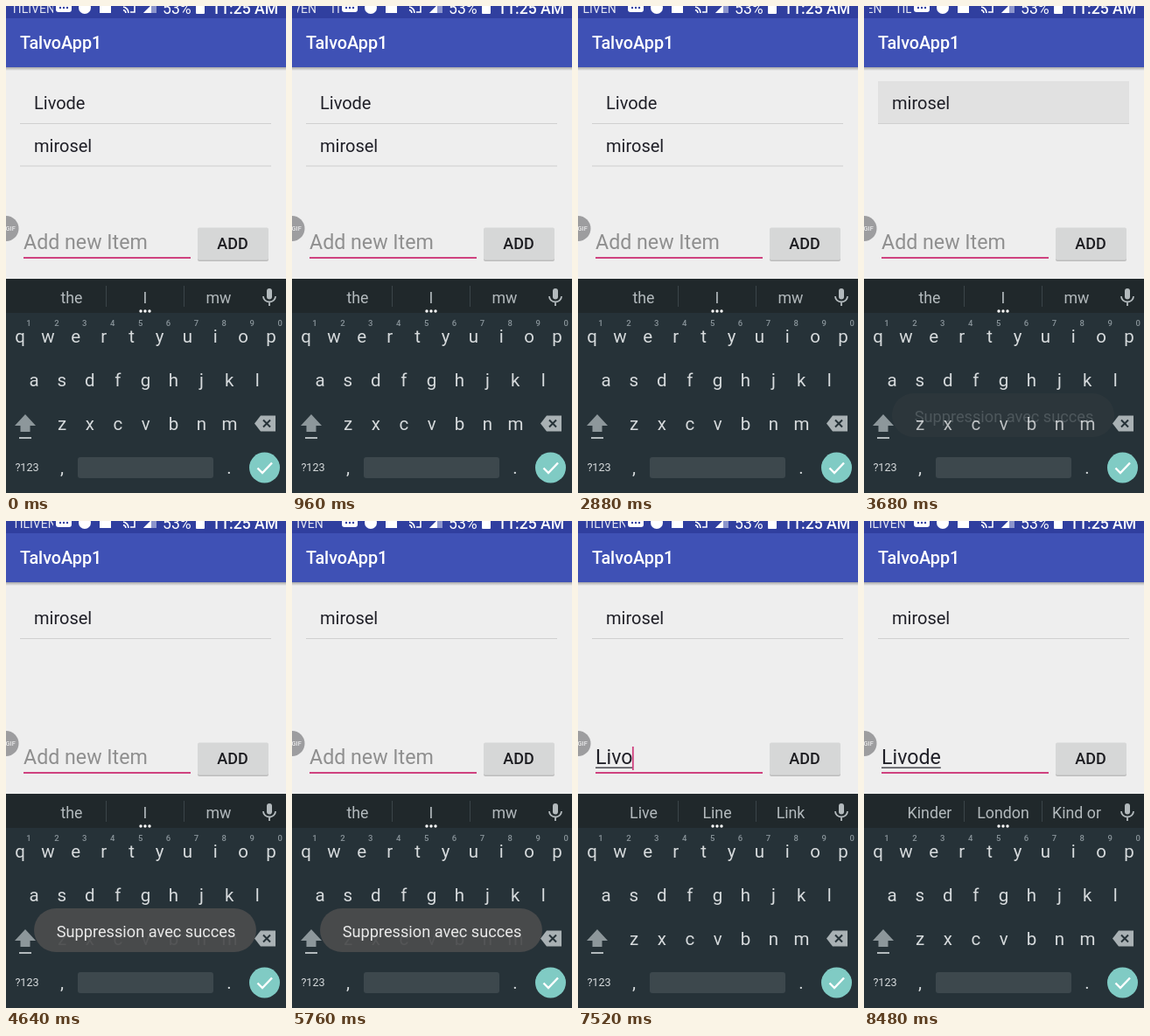
These frames come from a looping animation (320x557 px, 8640 ms). An HTML page:

```html
<!DOCTYPE html>
<html lang="en">
<head>
<meta charset="utf-8">
<title>List app</title>
<style>
  html, body { margin: 0; width: 100%; height: 100%; overflow: hidden; background: #eee; }
  svg { display: block; width: 320px; height: 557px; font-family: Roboto, "Noto Sans", sans-serif; }
  text { white-space: pre; }
</style>
</head>
<body>
<svg id="stage" viewBox="0 0 320 557">
  <defs>
    <clipPath id="carrierClip"><rect x="6" y="0" width="48" height="14"/></clipPath>
    <linearGradient id="shade" x2="0" y2="1">
      <stop offset="0" stop-color="#000" stop-opacity=".3"/>
      <stop offset="1" stop-color="#000" stop-opacity="0"/>
    </linearGradient>
  </defs>
</svg>
<script>
const LOOP = 8640, STEP = 160;
const APP = 'TalvoApp1', FIRST = 'Livode', SECOND = 'mirosel', CARRIER = 'TILIVEN';
const PINK = '#cf427f', KEY = '#d6dadc', DIM = '#b3babd';
const stage = document.getElementById('stage');

function add(tag, attrs, parent = stage) {
  const el = document.createElementNS('http://www.w3.org/2000/svg', tag);
  for (const k in attrs) el.setAttribute(k, attrs[k]);
  return parent.appendChild(el);
}
const rect = (x, y, width, height, fill, more, parent) =>
  add('rect', { x, y, width, height, fill, ...more }, parent);
const circle = (cx, cy, r, fill, parent) => add('circle', { cx, cy, r, fill }, parent);
const path = (d, fill, more) => add('path', { d, fill, ...more });
function label(str, x, y, size, fill, more, parent) {
  const el = add('text', { x, y, 'font-size': size, fill, ...more }, parent);
  el.textContent = str;
  return el;
}
const mid = { 'text-anchor': 'middle' };
const medium = { 'font-weight': 500 };
const stroke = (color, width) => ({ stroke: color, 'stroke-width': width });
const show = (el, on) => el.setAttribute('opacity', +on);

// App bar and status bar
rect(0, 0, 320, 557, '#eee');
rect(0, 70, 320, 4, 'url(#shade)');
rect(0, 0, 320, 70, '#3f51b5');
rect(0, 0, 320, 14, '#303f9f');
label(APP, 16, 49, 19.8, '#fff', medium);

const clip = add('g', { 'clip-path': 'url(#carrierClip)' });
const marquee = add('g', {}, clip);
const GAP = 65;
[0, GAP].forEach(x => label(CARRIER, 6 + x, 8, 14, '#e4e6f2', {}, marquee));

rect(57, -4, 18, 11, '#fff', { rx: 3 });
[62, 66, 70].forEach(x => circle(x, 2, 1.2, '#303f9f'));
circle(90, 2, 7, '#fff');
rect(107, -4, 13, 12, '#fff');
path('M134 -2H147V7H142M134 1a7 7 0 0 1 6 7M134 4.500a4 4 0 0 1 3 3.500', 'none', stroke('#fff', 1.6));
path('M157 8L172 -7V8Z', '#8c95cc');
path('M157 8L166 -1V8Z', '#fff');
label('53%', 179, 9, 17.6, '#fff');
rect(217, -5, 10, 14, '#fff', { rx: 1 });
label('11:25 AM', 235, 9, 17.6, '#fff', medium);

// List
const glow = rect(16, 86, 287, 48, '#e1e1e1');
rect(16, 134, 287, 1, '#d0d0d0');
const row1 = label(FIRST, 32, 118, 20, '#202028');
const row2 = add('g', {});
label(SECOND, 32, 167, 20, '#202028', {}, row2);
rect(16, 182.5, 287, 1, '#d0d0d0', {}, row2);

// Input and button
const hint = label('Add new Item', 20, 278, 23.2, '#8f8f8f');
const typed = label('', 20, 278, 23.2, '#202028');
const under = rect(20, 281.5, 0, 1.3, '#303038');
const caret = rect(20, 258, 1.8, 27, PINK);
rect(20, 287, 191, 2, PINK);
rect(219, 255, 81, 37, '#bdbdbd', { rx: 2 });
rect(219, 253.5, 81, 37, '#d6d7d7', { rx: 2 });
label('ADD', 259, 278, 18, '#1c1c20', { ...mid, ...medium });
circle(0, 254.5, 14.5, '#9d9d9f');
label('GIF', -.5, 257, 7.5, '#fff');

// Keyboard
rect(0, 312, 320, 245, '#263238');
rect(0, 312, 320, 39, '#20282b');
[114, 203].forEach(x => rect(x, 320, 1, 24, '#3b4549'));
const hints = [75, 159, 243].map(x => label('', x, 339.5, 17.8, DIM, mid));
[154, 159, 164].forEach(x => circle(x, 349, 1.7, '#fff'));
rect(298, 323, 6, 12.5, DIM, { rx: 3 });
path('M294 332a7 6.500 0 0 0 14 0M301 338.500V343', 'none', stroke(DIM, 1.8));

const keys = [];
[['qwertyuiop', 16, 385], ['asdfghjkl', 32, 435], ['zxcvbnm', 64, 485]].forEach(([row, x0, y]) =>
  [...row].forEach((ch, i) => keys.push(label(ch, x0 + i * 31.9, y, 20.5, KEY, mid))));
[...'1234567890'].forEach((n, i) =>
  label(n, 26 + i * 31.9, 366, 9.5, '#89949a', { ...mid, ...medium }));

path('M22 467L34 480H27.500V487H16.500V480H10Z', '#8d979b');
rect(15, 493, 14, 2, DIM);
path('M284 477.500L291 468.500H308V486.500H291Z', '#a9b1b4');
path('M294 473.500L302 481.500M302 473.500L294 481.500', 'none', stroke('#263238', 2));
label('?123', 24, 532, 12.6, KEY, mid);
label(',', 64, 535, 20.5, KEY, mid);
label('.', 255, 535, 20.5, KEY, mid);
rect(82, 516, 155, 24, '#3d484d', { rx: 3 });
circle(295.5, 528, 17.5, '#80cbc4');
path('M287.500 528.500L293 534L304 522.500', 'none', stroke('#fff', 2.4));

// Toast
const toast = add('g', {});
rect(32, 443, 254, 50, '#4b4c4d', { rx: 25, opacity: .93 }, toast);
label('Suppression avec succes', 160, 476, 18.2, '#e9e9e9', mid, toast);

// Timeline, in ms
const SCROLL = [[0, .5], [2720, 8], [5120, 2], [8320, 4]];
const TYPING = [6560, 6880, 7200, 7360, 7680, 7900];
const WORDS = [
  [0, 'the', 'I', 'mw'],
  [6240, 'The', 'I', 'Mw'],
  [6720, 'La', 'L', 'Lol'],
  [6880, 'Like', 'Li', 'Life'],
  [7200, 'Live', 'Line', 'Link'],
  [7680, 'Kind', 'London', 'Kinder'],
  [7900, 'Kinder', 'London', 'Kind or']
];
const last = (table, t) => table.filter(r => r[0] <= t).pop();
const ramp = (t, a, b) => Math.min(1, Math.max(0, (t - a) / (b - a)));
const set = (el, str) => { if (el.textContent !== str) el.textContent = str; };

function draw(t) {
  const [from, base] = last(SCROLL, t);
  const shift = base + (t - from) * .029;
  marquee.setAttribute('transform', `translate(${shift < GAP ? -shift : 0} 0)`);

  const removed = t >= 3680;
  set(row1, removed ? SECOND : FIRST);
  show(row2, !removed);
  show(glow, ramp(t, 2880, 3360) * (1 - ramp(t, 3680, 4000)));
  show(toast, ramp(t, 3600, 4000) * (1 - ramp(t, 5760, 6200)));

  const count = TYPING.filter(k => k <= t).length;
  set(typed, FIRST.slice(0, count));
  show(hint, !count);
  const width = count ? typed.getComputedTextLength() : 0;
  under.setAttribute('width', width);
  caret.setAttribute('x', 20 + width - (count ? .5 : 0));
  show(caret, count ? (t - TYPING[count - 1]) % 1000 < 500 : t % 1000 >= 140 && t % 1000 < 640);

  const upper = t >= 6240 && t < 6560;
  keys.forEach(k => set(k, upper ? k.textContent.toUpperCase() : k.textContent.toLowerCase()));
  last(WORDS, t).slice(1).forEach((w, i) => set(hints[i], w));
}

const start = performance.now();
function tick() {
  const t = (performance.now() - start) % LOOP;
  draw(Math.floor(t / STEP) * STEP);
  requestAnimationFrame(tick);
}
tick();
</script>
</body>
</html>
```
